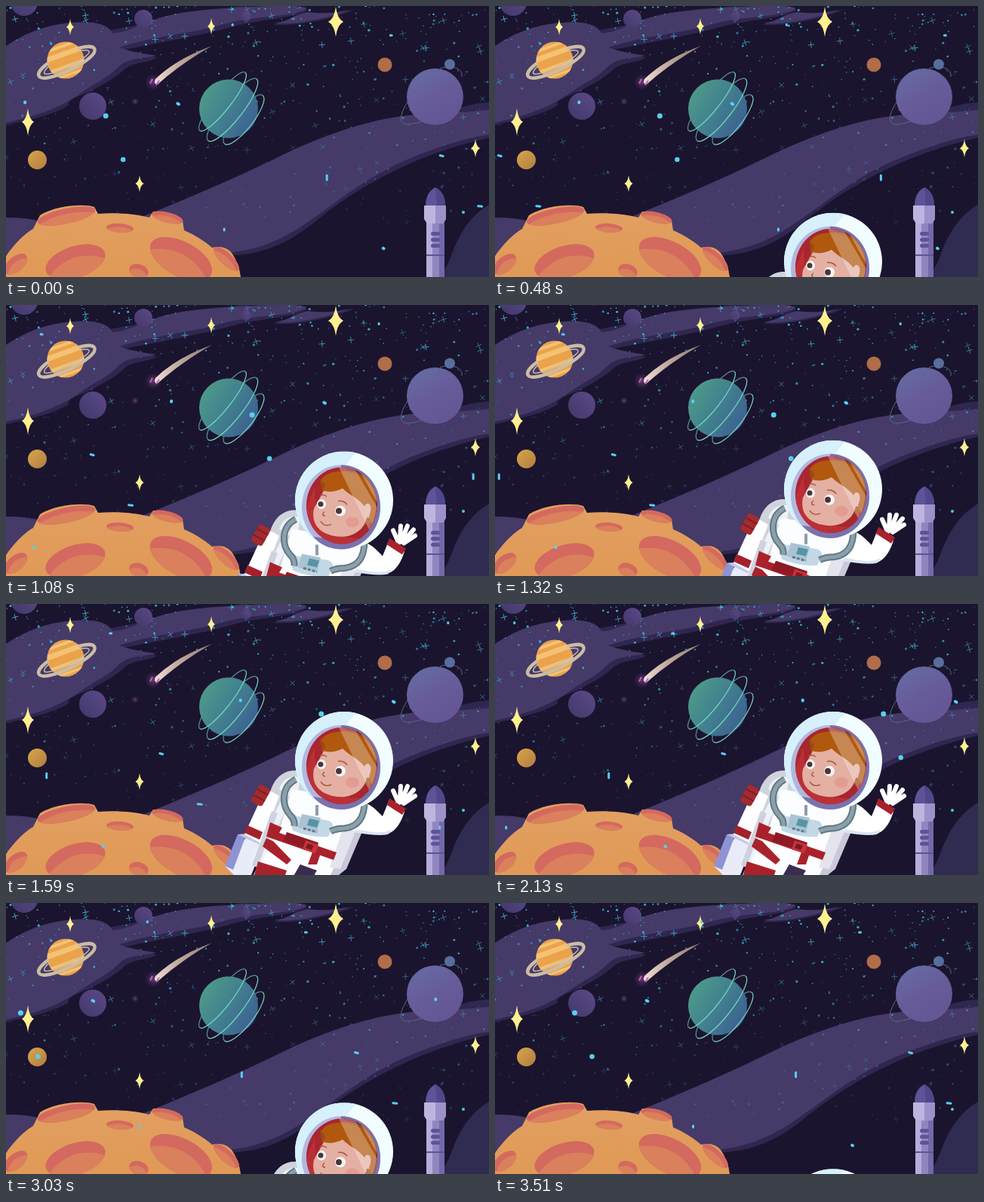
These frames come from a looping animation (640x360 px, 3.54 s). An HTML page:

```html
<!DOCTYPE html>
<html lang="en">
<head>
<meta charset="utf-8">
<title>Astronaut in space</title>
<style>
  html, body { margin: 0; width: 100%; height: 100%; overflow: hidden; background: #1b142e; }
  svg { display: block; width: 640px; height: 360px; }
</style>
</head>
<body>
<svg viewBox="0 0 640 360">
  <defs>
    <linearGradient id="teal" x1="0" y1=".2" x2="1" y2=".8"><stop offset="0" stop-color="#4f9c89"/><stop offset=".5" stop-color="#41808f"/><stop offset="1" stop-color="#3d5c92"/></linearGradient>
    <linearGradient id="violet" x1=".2" y1="0" x2=".8" y2="1"><stop offset="0" stop-color="#656ba3"/><stop offset=".5" stop-color="#675b9a"/><stop offset="1" stop-color="#645592"/></linearGradient>
    <linearGradient id="dusk" x1="1" y1="0" x2="0" y2="1"><stop offset="0" stop-color="#5c4989"/><stop offset="1" stop-color="#413869"/></linearGradient>
    <linearGradient id="gold" x1="0" y1="0" x2="1" y2="1"><stop offset="0" stop-color="#d9a54d"/><stop offset="1" stop-color="#b07d40"/></linearGradient>
    <linearGradient id="tail"><stop offset="0" stop-color="#f3dfd6"/><stop offset=".4" stop-color="#c0aba0"/><stop offset="1" stop-color="#94796f"/></linearGradient>
    <radialGradient id="glow"><stop offset="0" stop-color="#a55aa8" stop-opacity=".55"/><stop offset="1" stop-color="#7a3f93" stop-opacity="0"/></radialGradient>
    <linearGradient id="ground" x1="0" y1="0" x2="0" y2="1"><stop offset="0" stop-color="#e2a062"/><stop offset="1" stop-color="#e09956"/></linearGradient>
    <clipPath id="saturn"><circle cx="79" cy="72" r="24.5"/></clipPath>
    <clipPath id="helmet"><circle cx="448" cy="208" r="65"/></clipPath>
    <clipPath id="visor"><ellipse cx="445" cy="215" rx="47" ry="51"/></clipPath>
  </defs>
  <rect width="640" height="360" fill="#1b142e"/>

  <!-- nebula bands -->
  <g fill="#2f274f">
    <path d="M0 158C45 149 67 142 83 132C80 126 92 121 111 114C128 104 145 96 158 83C171 74 190 75 200 69C182 62 168 62 152 59C200 49 256 40 302 27C340 17 386 16 400 5L310 0L0 58Z"/>
    <path d="M290 332C344 330 372 315 404 291C445 256 490 229 545 205C580 191 612 181 640 175V128C622 129 606 133 590 139Z"/>
    <path d="M354 25C385 17 430 9 462 5C433 17 388 27 354 25Z"/>
  </g>
  <g fill="#453a68">
    <path d="M0 53C30 33 58 24 90 22C118 20 135 24 141 36C158 36 176 25 203 16C232 7 270 3 350 0H384C402 2 402 4 388 8C360 16 326 13 285 25C245 37 205 38 150 55C163 60 180 63 199 66C182 70 160 68 147 83C133 97 118 102 103 113C70 137 40 146 0 155Z"/>
    <path d="M178 281C240 256 312 225 366 198C425 170 480 151 535 145C572 140 598 143 640 138V171C603 176 560 192 527 206C470 232 436 263 397 289C367 310 330 327 281 329Z"/>
    <path d="M356 23C382 18 373 14 400 8C422 11 443 8 456 5C425 16 390 25 356 23Z"/>
    <path d="M0 281Q28 281 45 286L20 330H0Z"/>
  </g>
  <path d="M640 264C616 278 603 300 594 321C588 336 586 346 573 360H640Z" fill="#302b50"/>

  <g id="stars" stroke="#3fb6d6" stroke-width=".8"></g>

  <!-- planets -->
  <g fill="url(#dusk)">
    <circle cx="24" cy="-5" r="18"/><circle cx="182" cy="17" r="12"/>
    <circle cx="318" cy="14" r="6.5"/><circle cx="115" cy="133" r="18"/>
  </g>
  <circle cx="502" cy="78" r="9.5" fill="#b06d48"/>
  <circle cx="41.500" cy="204.500" r="12.500" fill="url(#gold)"/>

  <g clip-path="url(#saturn)">
    <rect x="50" y="44" width="60" height="60" fill="#eaa34b"/>
    <g transform="rotate(-20 79 72)" fill="#f4c275"><path d="M50 51h60v4H50zM50 60h60v7H50zM50 78h60v5H50zM50 90h60v3H50z"/></g>
  </g>
  <g transform="translate(80 74) rotate(-26)" fill="none" stroke="#cbbca6">
    <path d="M-22 -9C-34 -7 -41 -3 -41 1C-41 8 -22 12 0 12S41 8 41 1C41 -3 34 -7 22 -9" stroke-width="4.500"/>
    <path d="M-23 -5C-30 -3 -33 -1 -33 1C-33 5 -16 7 0 7S33 5 33 1C33 -1 30 -3 23 -5" stroke-width="1.500"/>
  </g>

  <g fill="none" stroke-width="1.300">
    <g id="hoopsBack" stroke="#548f95"></g>
    <circle cx="295" cy="136.500" r="39" fill="url(#teal)"/>
    <g id="hoopsFront" stroke="#71d2bb"></g>
  </g>

  <path d="M575 83C588 78 606 82 604 94M533 126C521 145 519 158 534 157C548 156 563 149 578 139" fill="none" stroke="#606683"/>
  <circle cx="568.500" cy="120.500" r="37.500" fill="url(#violet)"/>
  <circle cx="588" cy="77.500" r="7" fill="#586f9e"/>

  <!-- comet -->
  <circle cx="195" cy="101" r="11" fill="url(#glow)"/>
  <circle cx="171" cy="127" r="5" fill="url(#glow)"/>
  <path d="M273 53Q226 70 198 97Q195 104 201 104Q234 75 273 53Z" fill="url(#tail)"/>
  <path d="M191 103l3 -6M199 105l4 -6" stroke="#b765b8" stroke-width="2"/>

  <g id="sparkles" fill="#fff08f"></g>

  <!-- rocket -->
  <path d="M557 283H581V360H557Z" fill="#9185bf"/>
  <path d="M557 283H565V360H557Z" fill="#b7acda"/>
  <path d="M574 283H581V360H574Z" fill="#7469a9"/>
  <path d="M556 265C556 252 562 244 569 241C576 244 582 252 582 265Z" fill="#5d5398"/>
  <path d="M569 241C576 244 582 252 582 265H571Z" fill="#50478b"/>
  <path d="M554 265H583V283L579 289H558L554 283Z" fill="#bfb4df"/>
  <path d="M569 265H583V283L579 289H569Z" fill="#9c91c8"/>
  <g fill="#5d5398"><rect x="563" y="300" width="12" height="5" rx="2.500"/><rect x="563" y="308" width="12" height="5" rx="2.500"/><rect x="563" y="316" width="12" height="5" rx="2.500"/><path d="M557 330h24v2h-24z"/></g>

  <!-- cratered ground -->
  <path d="M0 332C12 315 24 303 36 296L45 278C65 265 103 262 117 267L122 276C146 274 171 276 190 281L195 273Q225 273 234 285L236 298C252 305 264 313 273 321Q290 317 299 328Q309 342 311 360H0Z" fill="url(#ground)"/>
  <g id="craters"></g>

  <g id="drifters" fill="#58cff0"></g>

  <!-- astronaut, placed at its highest position -->
  <g id="astronaut">
    <!-- backpack -->
    <path d="M350 250C356 228 372 218 390 222L400 260L381 290L350 326L327 313Z" fill="#cfd3dc"/>
    <path d="M362 246C366 232 378 228 390 230L385 262Z" fill="#eef0f5"/>
    <path d="M449 286L477 268L473 300L451 352L441 360H416Z" fill="#cbc8da"/>
    <path d="M322 305L343 314L325 360H302L290 348Z" fill="#e9ebf8"/>
    <path d="M307 306L317 310L301 353L290 348Z" fill="#8f93d3"/>
    <path d="M307 306L322 305L343 314L338 321Z" fill="#c3c8ea"/>
    <path d="M344 245L362 255L338 318L316 306Z" fill="#fff"/>
    <path d="M320 294L340 303L336 313L316 304Z" fill="#a3212a"/>
    <g transform="translate(337 254) rotate(29)"><rect x="-8" y="-13" width="17" height="26" rx="4" fill="#a52a2e"/><path d="M-8-5h17M-8 4h17" stroke="#77202a" stroke-width="2"/></g>
    <!-- suit -->
    <path d="M379 246L465 260L477 275L452 311L430 360H410L390 346L382 360H328L344 325L364 295Z" fill="#fcfdff"/>
    <path d="M364 262L372 270L338 345L326 338Z" fill="#eef1f8"/>
    <path d="M352 275L360 278L333 350L326 347Z" fill="#cfd2de"/>
    <path d="M446 300L464 300L443 352L429 350Z" fill="#e4e4ee"/>
    <path d="M390 346L412 354L408 360H382Z" fill="#3a2d50"/>
    <path d="M466 266C479 260 489 272 499 282L507 262L528 276C524 289 517 302 506 305C493 308 475 304 460 301Z" fill="#fff"/>
    <path d="M464 299C482 303 500 306 512 299L506 306Q493 309 460 303Z" fill="#d9e6f2"/>
    <path d="M520 264L513 248M522 260L523 242M525 260L532 242M527 262L540 247M527 265L542 255M518 266L524 262" fill="none" stroke="#fff" stroke-width="6" stroke-linecap="round"/>
    <path d="M508 258L530 272L525 280L505 267Z" fill="#a9222b"/>
    <!-- harness -->
    <g fill="#a9222b">
      <path d="M350 290L366 297L362 304L438 330L434 340L345 309Z"/>
      <path d="M345 311L354 315L378 340L372 346L340 322ZM407 327L417 331L412 346H400ZM334 342L372 354L370 360H329Z"/>
    </g>
    <path d="M372 303L414 317L410 329L367 315Z" fill="#8d1a25"/>
    <path d="M397 314L414 320L410 331L393 326Z" fill="#c7333a"/><path d="M400 318l8 3l-3 6l-8-3z" fill="#7d1822"/>
    <!-- chest unit and hoses -->
    <path d="M376 283Q380 277 386 282L424 287Q436 289 432 299L427 309Q404 311 380 301Z" fill="#c3d8e6"/>
    <path d="M392 279L417 284L412 304L387 297Z" fill="#a9c3d3"/>
    <path d="M402 285L415 288L412 297L399 294Z" fill="#5794a6"/>
    <path d="M394 298l18 5" stroke="#637985" stroke-width="3" stroke-dasharray="4 2"/>
    <path d="M412 267v14" stroke="#8f9da8" stroke-width="4"/>
    <g fill="none">
      <path id="hose" d="M384 233C364 243 365 268 377 281Q383 287 382 295M475 262C475 287 464 296 449 298Q438 298 430 302" stroke="#617884" stroke-width="9"/>
      <path d="M384 233C364 243 365 268 377 281Q383 287 382 295M475 262C475 287 464 296 449 298Q438 298 430 302" stroke="#8ba0aa" stroke-width="5"/>
    </g>

    <!-- helmet -->
    <g clip-path="url(#helmet)">
      <rect x="383" y="143" width="130" height="130" fill="#f2fdff"/>
      <path d="M383 143H466C430 175 420 235 452 273H383Z" fill="#d6f1fc"/>
    </g>
    <ellipse cx="444" cy="217" rx="52" ry="56" fill="#b3b6e0"/>
    <path d="M444 161A52 56 0 0 1 444 273Q420 272 407 256L444 262Z" fill="#7a72ad"/>
    <g clip-path="url(#visor)">
      <rect x="390" y="150" width="120" height="125" fill="#a8262e"/>
      <path d="M436 157Q510 155 504 238L477 267Q502 195 436 157Z" fill="#8a1a29"/>
      <path d="M398 218Q405 266 449 268L470 258Q408 260 409 190Z" fill="#bb3036"/>
      <path d="M416 181C434 164 469 164 483 183C497 203 491 233 479 242L455 221L420 202Z" fill="#9c4a14"/>
      <path d="M424 190C445 181 476 191 480 212C488 209 493 218 487 227C483 233 479 230 478 231C474 251 453 260 433 255C415 251 404 239 408 219Z" fill="#e3b0a3"/>
      <path d="M418 182C421 167 457 165 476 180C493 194 493 222 485 240L481 229C488 213 478 208 475 216C466 204 454 201 446 192Q433 199 419 195Q427 188 418 182Z" fill="#b1580f"/>
      <ellipse cx="459" cy="237" rx="9" ry="7" fill="#e3958c" opacity=".7"/>
      <g fill="#f7f4f5"><ellipse cx="418" cy="213" rx="6" ry="6.500"/><ellipse cx="443" cy="222" rx="7" ry="7"/></g>
      <g fill="#4a3538"><circle cx="417" cy="213" r="3.500"/><circle cx="441" cy="222" r="4"/></g>
      <path d="M416 202q5-3 9 1M440 209q8-1 12 5M422 223q-5 5 1 6M417 236q5 8 14 4" fill="none" stroke="#a9583f" stroke-width="1.500"/>
      <path d="M438 158L461 164L501 233L485 255Z" fill="#fff" opacity=".28"/>
      <path d="M466 164L474 169L503 219V231Z" fill="#fff" opacity=".3"/>
    </g>
  </g>
</svg>
<script>
const LOOP = 3540, SPEED = 0.1796, SPAN = 657, MARGIN = 9;
const $ = id => document.getElementById(id);

let seed = 21;
const rand = () => (seed = seed * 16807 % 2147483647) / 2147483647;

// Fixed star field: dense near the top, fainter towards the bottom
let field = '';
for (let i = 0; i < 600; i++) {
  const x = rand() * 640, y = 290 * rand() ** 1.35, r = 0.6 + rand() ** 3 * 1.2;
  const fade = (1.15 - y / 300) * (0.45 + 0.55 * rand());
  field += i % 12
    ? `<circle cx="${x}" cy="${y}" r="${r}" fill="#38d0ea" stroke="none" opacity="${fade}"/>`
    : `<path d="M${x - 3} ${y - 3}l6 6m0-6l-6 6" transform="rotate(${rand() * 45} ${x} ${y})" opacity="${fade}"/>`;
}
$('stars').innerHTML = field + '<circle cx="606" cy="274" r="2" fill="#40cce3" stroke="none"/>';

// Four-pointed sparkles: x, y, half width, half height
$('sparkles').innerHTML = [
  [437, 21, 10, 20], [85, 28, 5, 11], [272, 27, 5, 11],
  [29, 154, 8, 18], [177, 236, 5.5, 11], [622, 189, 6, 12]
].map(([x, y, w, h]) =>
  `<path d="M${x} ${y - h}Q${x + w * .2} ${y - h * .2} ${x + w} ${y}Q${x + w * .2} ${y + h * .2} ${x} ${y + h}Q${x - w * .2} ${y + h * .2} ${x - w} ${y}Q${x - w * .2} ${y - h * .2} ${x} ${y - h}Z"/>`
).join('');

// Tilted orbits, split into the halves behind and before the planet
const hoops = sweep => [[287, 127, 49, 11], [300, 138, 52, 13], [315, 151, 41, 12]].map(([x, y, a, b]) =>
  `<path d="M${-a} 0A${a} ${b} 0 0 ${sweep} ${a} 0" transform="translate(${x} ${y}) rotate(-52)"/>`
).join('');
$('hoopsBack').innerHTML = hoops(1);
$('hoopsFront').innerHTML = hoops(0);

// Craters: x, y, radii, tilt
$('craters').innerHTML = [
  [80, 279, 39, 10, -12], [214, 281, 21, 7, 14], [292, 336, 22, 8, 43], [151, 295, 18, 6, 4],
  [92, 340, 41, 21, -18], [232, 336, 45, 23, 28], [176, 352, 13, 9, 18], [13, 343, 18, 10, -40]
].map(([x, y, a, b, tilt]) =>
  `<g transform="translate(${x} ${y}) rotate(${tilt})"><ellipse rx="${a}" ry="${b}" fill="#d4695f"/>` +
  `<path d="M${-a * .94} ${b * .34}Q0 ${-b * .9} ${a * .94} ${b * .34}Q${a * .65} ${b} 0 ${b}Q${-a * .65} ${b} ${-a * .94} ${b * .34}Z" fill="#da805c"/></g>`
).join('');

// Drifting confetti: x, y, width, height, tilt
const drifters = [
  [132, 146, 7, 7, 0], [155, 204, 6.5, 6.5, 0], [289, 297, 3, 5, 0], [425, 228, 3, 9, 0],
  [577, 199, 7, 3, 15], [628, 266, 8, 3, 5], [228, 130, 6, 4, 30], [25, 128, 4, 5, 0],
  [510, 39, 5, 3, 0], [500, 322, 5, 4, 25], [300, 25, 3, 4, 0]
].map(([x, y, w, h, tilt]) => {
  const el = document.createElementNS('http://www.w3.org/2000/svg', 'rect');
  const attrs = { x: -w / 2, y: -h / 2, width: w, height: h, rx: Math.min(w, h) / 2 };
  for (const name in attrs) el.setAttribute(name, attrs[name]);
  $('drifters').append(el);
  return { el, x, y, tilt };
});

// Time and height of the top of the helmet
const path = [[0, 363], [840, 209], [1320, 180], [1522, 143], [2364, 143], [LOOP, 358.6]];
function helmetTop(t) {
  const i = path.findIndex(([end]) => t < end);
  const [t0, y0] = path[i - 1], [t1, y1] = path[i];
  return y0 + (y1 - y0) * (t - t0) / (t1 - t0);
}

function draw() {
  const t = performance.now() % LOOP;
  $('astronaut').setAttribute('transform', `translate(0 ${helmetTop(t) - 143})`);
  for (const { el, x, y, tilt } of drifters) {
    const left = (x + SPEED * t + MARGIN) % SPAN - MARGIN;
    el.setAttribute('transform', `translate(${left} ${y}) rotate(${tilt})`);
  }
  requestAnimationFrame(draw);
}
draw();
</script>
</body>
</html>
```
